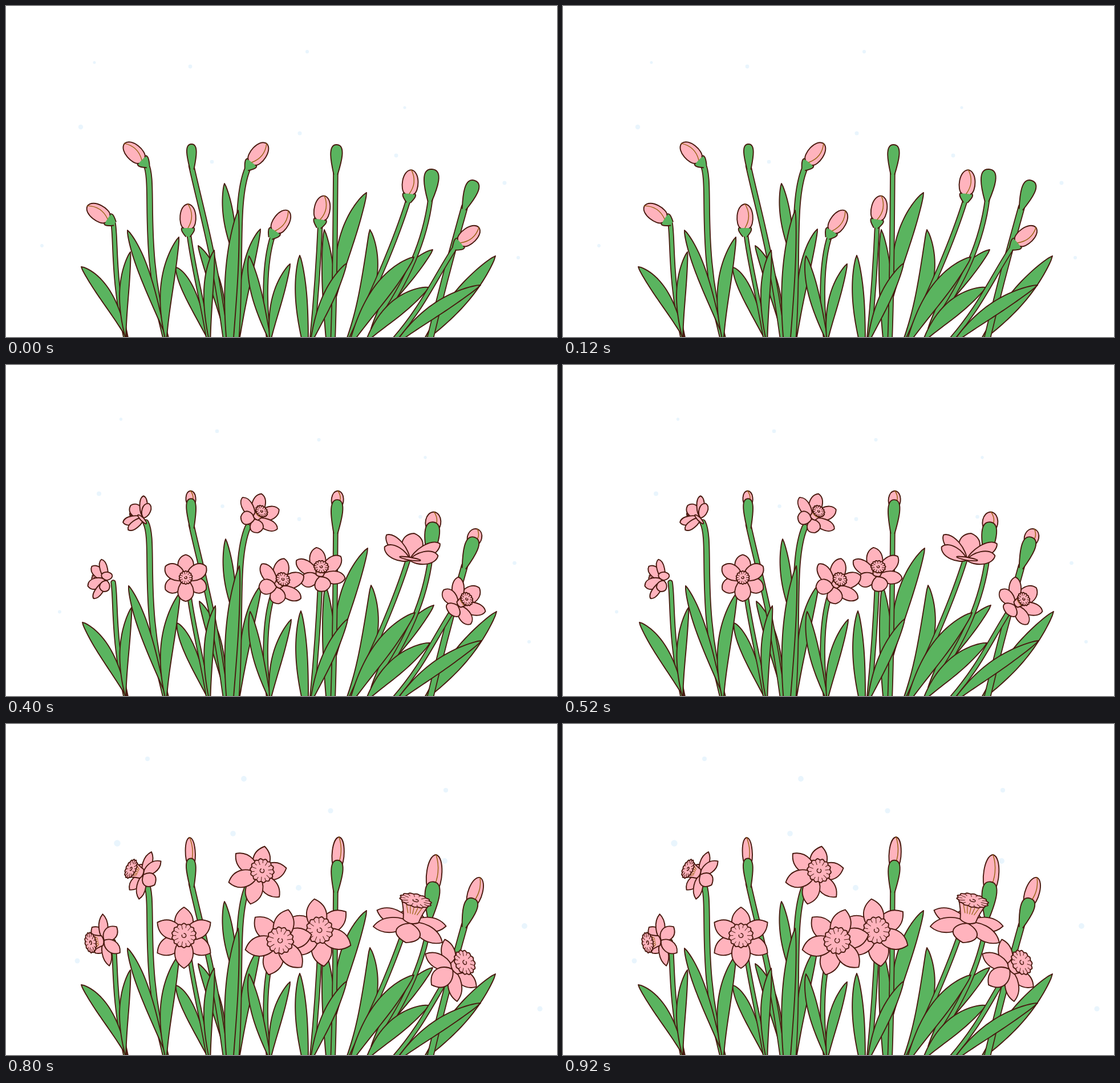
Write an HTML page with a canvas that moves like this. It is 966 px wide and 580 px high and loops after 1000 ms.

```html
<!DOCTYPE html>
<html lang="en">
<head>
<meta charset="utf-8">
<title>Spring flowers</title>
<style>
html, body { margin: 0; width: 100%; height: 100%; overflow: hidden; background: #fff; }
canvas { display: block; }
</style>
</head>
<body>
<canvas id="stage" width="966" height="580"></canvas>
<script>
const ctx = document.getElementById('stage').getContext('2d');
const GREEN = '#5ab45f', PINK = '#ffb3bd', INK = '#48190f', GOLD = '#95600f', SNOW = '#e9f5fd';
const LOOP = 1000, POSES = 5, RAD = Math.PI / 180;
const EGG = [.1, 1.3, .95, 1.3], CUP = [.4, .9, 1, 1.7];
let pose = 0;

const mix = (a, b, t) => a + (b - a) * t;
const along = (x, y, angle, d) => [x + Math.cos(angle) * d, y + Math.sin(angle) * d];
const wave = () => Math.sin(Math.PI * pose / (POSES - 1));

function seeded(seed) {
  return () => (seed = (seed * 16807) % 2147483647) / 2147483647;
}

function ink(fill, color = INK, width = 1.9) {
  if (fill) { ctx.fillStyle = fill; ctx.fill(); }
  ctx.strokeStyle = color;
  ctx.lineWidth = width;
  ctx.stroke();
}

// Symmetric outline from base to tip; kind holds two handles as [along, across]
function shape([x, y], [tx, ty], w, kind, fill, neck = 0) {
  const dx = tx - x, dy = ty - y, len = Math.hypot(dx, dy) || 1;
  const at = (u, v) => [x + dx * u - dy / len * w * v, y + dy * u + dx / len * w * v];
  const [a, p, b, q] = kind;
  ctx.beginPath();
  ctx.moveTo(...at(0, neck / w));
  ctx.bezierCurveTo(...at(a, p), ...at(b, q), tx, ty);
  ctx.bezierCurveTo(...at(b, -q), ...at(a, -p), ...at(0, -neck / w));
  ink(fill);
}

function stem(w, x, y, ...curve) {
  ctx.beginPath();
  ctx.moveTo(x, y);
  ctx.bezierCurveTo(...curve);
  ink(null, INK, w + 1.5);
  ink(null, GREEN, w - 2);
}

// Leaf along a curved spine; its tip sways a little
function leaf(w, x, y, cx, cy, tx, ty) {
  tx += 2 * wave();
  ty -= 6 * wave();
  const left = [], right = [];
  for (let n = 0; n <= 30; n++) {
    const u = n / 30, v = 1 - u;
    const px = v * v * x + 2 * v * u * cx + u * u * tx;
    const py = v * v * y + 2 * v * u * cy + u * u * ty;
    const dx = v * (cx - x) + u * (tx - cx), dy = v * (cy - y) + u * (ty - cy);
    const h = w * Math.max(0, Math.sin(Math.PI * u ** 1.2)) ** .75 / Math.hypot(dx, dy);
    left.push([px - dy * h, py + dx * h]);
    right.unshift([px + dy * h, py - dx * h]);
  }
  ctx.beginPath();
  for (const p of left.concat(right)) ctx.lineTo(...p);
  ctx.closePath();
  ink(GREEN);
}

function bud([jx, jy], [tx, ty], w) {
  shape([jx, jy], [tx, ty], w, EGG, PINK, w * .6);
  const mx = (jx + tx) / 2, my = (jy + ty) / 2, k = w / Math.hypot(tx - jx, ty - jy);
  ctx.beginPath();
  ctx.moveTo(jx, jy);
  ctx.quadraticCurveTo(mx - (ty - jy) * k, my + (tx - jx) * k, tx, ty);
  ink(null, GOLD, 1.4);
}

// Green bulb that grows from tip a to tip b and lets out a pink bud
function bulb(w, base, a, b) {
  const t = pose / (POSES - 1), share = .42 * t;
  const tip = [mix(a[0], b[0], t), mix(a[1], b[1], t)];
  const top = [mix(tip[0], base[0], share), mix(tip[1], base[1], share)];
  const root = [mix(top[0], base[0], .2), mix(top[1], base[1], .2)];
  if (pose) bud(root, tip, w * .9);
  shape(base, top, w * .9, CUP, GREEN, 3.5);
}

// Trumpet from foot to rim, r across and q along the axis
function trumpet([x, y], [fx, fy], angle, r, q) {
  const depth = Math.hypot(x - fx, y - fy);
  ctx.save();
  ctx.translate(x, y);
  ctx.rotate(angle);
  ctx.beginPath();
  ctx.moveTo(0, -r * .95);
  ctx.quadraticCurveTo(-depth * .5, -r * .6, -depth, -r * .5);
  ctx.quadraticCurveTo(-depth - r * .3, 0, -depth, r * .5);
  ctx.quadraticCurveTo(-depth * .5, r * .6, 0, r * .95);
  ink(PINK);
  if (depth > r) for (let s = -.5; s < .6; s += .25) {
    ctx.beginPath();
    ctx.moveTo(-q, r * s);
    ctx.lineTo(-depth * .65, r * s * .6);
    ink(null, GOLD, 1.2);
  }
  ctx.beginPath();
  for (let i = 0; i <= 84; i++) {
    const a = i * Math.PI / 42, k = 1 + .05 * Math.cos(a * 14);
    ctx.lineTo(Math.cos(a) * q * k, Math.sin(a) * r * k);
  }
  ink(PINK);
  for (let i = 0; i < 14; i++) {
    const a = (i + .5) * Math.PI / 7, k = i % 2 ? .55 : .68;
    ctx.beginPath();
    ctx.moveTo(Math.cos(a) * q * .92, Math.sin(a) * r * .92);
    ctx.lineTo(Math.cos(a) * q * k, Math.sin(a) * r * k);
    ink(null, INK, 1);
  }
  ctx.beginPath();
  ctx.ellipse(0, 0, q * .18, r * .18, 0, 0, 5);
  ink(null, INK, 1.5);
  ctx.restore();
}

// Bud, then six petals on a cone that opens while the flower turns to its final view
function flower({ joint, from, at, to, tilt, size, turn }) {
  const start = from * RAD;
  if (pose < 2) shape(along(...joint, start, -15), along(...joint, start, 3), 11, CUP, GREEN, 4);
  if (!pose) return bud(joint, along(...joint, start, 42), 13);

  const step = (pose - 1) / 3, ease = 1 - (1 - step) ** 2;
  const first = along(...joint, start, 26 * Math.cos(tilt[0]) - 14);
  const centre = [mix(first[0], at[0], ease), mix(first[1], at[1], ease)];
  const face = mix(from, to, ease) * RAD, lean = mix(tilt[0], tilt[1], ease);
  const sin = Math.sin(lean), cos = Math.cos(lean);
  const reach = size * (pose === 4 ? 1 : .86);
  const list = [];

  function ring(count, open, r, shift) {
    const so = Math.sin(open * RAD), co = Math.cos(open * RAD);
    for (let i = 0; i < count; i++) {
      const a = (turn + shift + i * 360 / count) * RAD;
      const ahead = r * (sin * co + cos * so * Math.cos(a)), side = r * so * Math.sin(a);
      list.push({
        z: cos * co - sin * so * Math.cos(a) + i % 2 * .1,
        tip: along(...along(...centre, face, ahead), face + Math.PI / 2, side),
        w: r * .31 * (1 - .5 * sin * Math.abs(Math.sin(a)))
      });
    }
  }
  ring(6, mix(35, 95, 1 - (1 - step) ** 1.5), reach, 0);
  if (pose === 1) ring(3, 15, reach * .72, 30);
  list.sort((a, b) => a.z - b.z);

  const grow = reach * .38 * mix(.45, 1, step);
  const cup = () => trumpet(along(...centre, face, reach * .62 * sin), along(...centre, face, 4 * sin),
    face, grow, grow * Math.max(cos, .3));
  const hidden = pose === 2 && lean > .9;
  if (hidden) cup();
  const kind = [.2, 1.1, mix(.95, .72, step), 1.45];
  for (const p of list) shape(centre, p.tip, p.w, kind, PINK);
  if (pose > 1 && !hidden) cup();
}

function leftBed() {
  stem(8, 188, 381, 193, 410, 187, 480, 211, 585);
  leaf(11, 213, 584, 178, 496, 132, 457);
  leaf(8, 210, 584, 200, 500, 218, 431);
  stem(10, 245, 276, 262, 310, 236, 420, 281, 585);
  leaf(9, 279, 575, 240, 455, 213, 393);
  leaf(11, 281, 590, 272, 490, 303, 405);
  leaf(10, 360, 595, 320, 490, 298, 458);
  leaf(10, 385, 580, 374, 480, 337, 420);
  stem(9, 325, 280, 345, 370, 365, 430, 386, 590);
  stem(7, 320, 394, 326, 450, 345, 520, 355, 585);
  leaf(8, 358, 595, 348, 495, 365, 428);
}

function middleBed() {
  leaf(9, 404, 450, 390, 380, 383, 311);
  leaf(9, 410, 580, 417, 455, 446, 391);
  stem(10, 424, 284, 400, 340, 414, 450, 403, 590);
  leaf(11, 394, 650, 388, 490, 407, 358);
  stem(8, 468, 402, 452, 450, 452, 530, 462, 590);
  leaf(9, 466, 595, 436, 505, 426, 438);
  leaf(9, 463, 590, 468, 515, 498, 452);
  leaf(10, 530, 630, 515, 520, 515, 437);
  leaf(11, 568, 660, 570, 500, 558, 392);
  leaf(13, 576, 520, 588, 405, 632, 327);
  stem(8, 578, 285, 577, 380, 577, 490, 573, 590);
  stem(8, 551, 380, 548, 450, 543, 520, 536, 590);
  leaf(10, 533, 595, 558, 515, 597, 451);
}

function rightBed() {
  leaf(13, 595, 590, 652, 490, 638, 392);
  leaf(12, 640, 565, 690, 475, 748, 427);
  stem(8, 744, 338, 735, 410, 705, 480, 650, 560);
  stem(8, 705, 341, 682, 415, 648, 490, 602, 590);
  leaf(15, 600, 600, 648, 496, 715, 440);
  leaf(14, 630, 590, 674, 526, 741, 493);
  leaf(14, 730, 590, 790, 520, 858, 438);
  stem(11, 804, 352, 788, 410, 770, 470, 742, 590);
  stem(8, 786, 425, 750, 480, 730, 530, 676, 590);
  leaf(11, 680, 595, 742, 529, 832, 489);
}

function bulbs() {
  bulb(9, [326, 286], [325, 242], [322, 199]);
  bulb(11, [578, 295], [580, 243], [584, 198]);
  bulb(14, [743, 342], [747, 286], [754, 229]);
  bulb(13, [803, 356], [822, 306], [831, 269]);
}

const flowers = [
  { joint: [178, 373], from: -147, at: [172, 379], to: -190, tilt: [1.2, 1], size: 46, turn: 35 },
  { joint: [238, 270], from: -136, at: [241, 264], to: -155, tilt: [1.2, 1.05], size: 45, turn: 10 },
  { joint: [319, 389], from: -90, at: [312, 374], to: -90, tilt: [.1, .1], size: 54, turn: 0 },
  { joint: [431, 274], from: -52, at: [442, 264], to: -45, tilt: [1.2, .3], size: 54, turn: 30 },
  { joint: [551, 374], from: -80, at: [549, 365], to: -80, tilt: [1.2, .1], size: 60, turn: 42 },
  { joint: [472, 394], from: -57, at: [478, 382], to: -45, tilt: [1.2, .1], size: 60, turn: 32 },
  { joint: [707, 329], from: -85, at: [709, 349], to: -77, tilt: [1.2, 1.15], size: 72, turn: 0 },
  { joint: [797, 415], from: -40, at: [783, 430], to: -30, tilt: [.6, .75], size: 58, turn: 55 }
];

// Each flake drifts from its first place to its last on a sagging path
function snow() {
  const random = seeded(11), t = pose / (POSES - 1);
  const flake = (x, y, ex, ey) => {
    const r = (2.5 + 2 * random()) * (1 - .25 * wave()) + 1.5 * t;
    ctx.beginPath();
    ctx.arc(mix(x, ex, t), mix(y, ey, t) + 15 * wave(), r, 0, 7);
    ctx.fill();
  };
  ctx.fillStyle = SNOW;
  flake(155, 99, 248, 61);
  flake(323, 106, 417, 96);
  flake(528, 80, 569, 152);
  flake(699, 178, 771, 116);
  flake(131, 212, 195, 209);
  flake(361, 273, 398, 192);
  flake(515, 223, 513, 287);
  flake(684, 262, 769, 240);
  flake(874, 310, 909, 354);
  flake(898, 441, 936, 499);
  flake(63, 420, 125, 415);
}

function draw() {
  ctx.fillStyle = '#fff';
  ctx.fillRect(0, 0, 966, 580);
  ctx.lineJoin = ctx.lineCap = 'round';
  snow();
  leftBed();
  middleBed();
  rightBed();
  bulbs();
  flowers.forEach(flower);
}

let start = null, shown = -1;
function tick(now) {
  if (start === null) start = now;
  pose = Math.floor((now - start) % LOOP / LOOP * POSES);
  if (pose !== shown) {
    shown = pose;
    draw();
  }
  requestAnimationFrame(tick);
}
draw();
requestAnimationFrame(tick);
</script>
</body>
</html>
```
